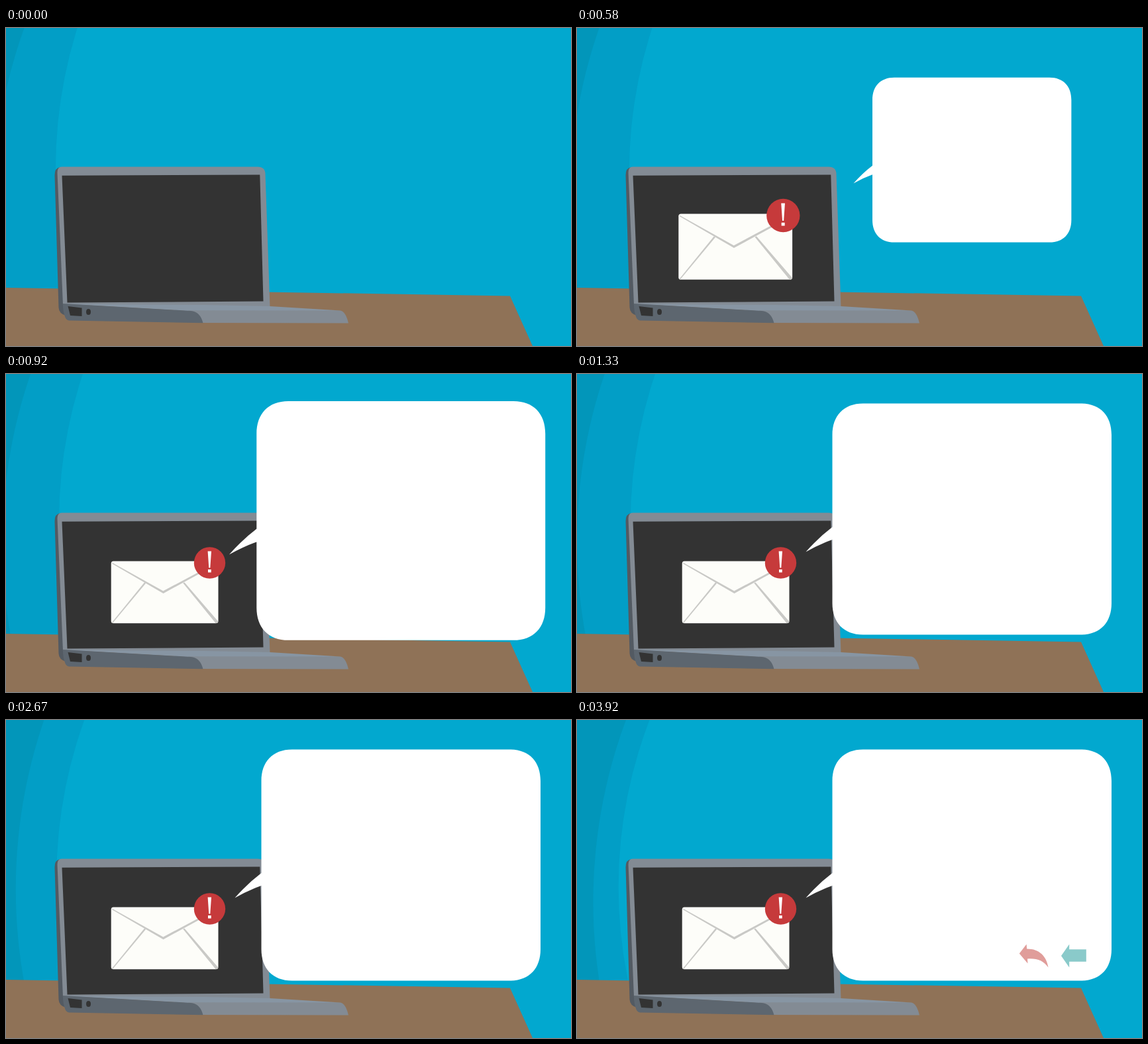
An HTML page that plays this animation: 853x480 px, repeating every 4.01 s.

```html
<!DOCTYPE html>
<html lang="en">
<head>
<meta charset="utf-8">
<title>New mail</title>
<style>
  html, body { margin: 0; width: 100%; height: 100%; overflow: hidden; background: #0296ba; }
  svg { display: block; width: 100vw; height: 100vh; }
</style>
</head>
<body>
<svg viewBox="0 0 853 480" preserveAspectRatio="none">
  <rect width="853" height="480" fill="#0296ba"/>
  <circle id="outer" r="785" fill="#029ec6"/>
  <circle id="inner" r="700" fill="#02a8cf"/>

  <path fill="#8f7257" d="M0 392 L761 404.5 L795 480 H0Z"/>

  <g id="laptop">
    <path fill="#535a62" d="M82 210 Q73.5 211 73.5 222 L79.5 422 Q80 431 90 434 L100 420Z"/>
    <path fill="#838b94" d="M84 209.5 H380 Q391 209.5 391.5 220 L398.5 421 L86 418 L77.5 218 Q77.5 209.5 84 209.5Z"/>
    <path fill="#333" d="M84.5 222.7 L383.3 221.4 L388.5 412.4 L92.5 414.6Z"/>
    <path fill="#8795a3" d="M90 416.5 L300 418 L398.5 420 L505 426.5 L400 431 L280 427.5Z"/>
    <path fill="#838b94" d="M275 426.3 L505 426.5 Q513 428 517 445.5 L290 445Z"/>
    <path fill="#5d666f" d="M86 416 L279 427 Q293 428 297.5 445.3 L95 441.5 Q90 441 88.5 434 Q86 428 86 416Z"/>
    <path fill="#333" d="M93.5 420 L114.5 422.5 V435 L97 434Z"/>
    <ellipse cx="124.5" cy="428.4" rx="3.5" ry="4.5" fill="#333"/>
  </g>

  <g id="mail">
    <rect x="158.7" y="282.6" width="161.8" height="93.6" rx="3.5" fill="#fdfdf9"/>
    <g fill="#c9c9c6">
      <path d="M160 284.5 L237.3 327.6 L318 284.5 L318.5 287 L237.5 331.2 L160.5 286.5Z"/>
      <path d="M159.7 375.3 L209 314.6 L211.2 315.8 L161.2 375.8Z"/>
      <path d="M267.2 315.6 L269.4 314.4 L320.3 373.5 Q320.3 376 316.5 376Z"/>
    </g>
    <circle cx="307.5" cy="285" r="23.7" fill="#c63a3b"/>
    <path fill="#fff" d="M304.6 267.6 H310 L308.3 292.4 H306.3Z M305 295 H309.7 V299.6 H305Z"/>
  </g>

  <path id="bubble" fill="#fff" d="M432 44.5 H760.5 C790 44.5 807 63 807 92 V346 C807 375 790 393.5 760.5 393.5
    H432 C402.5 393.5 385.5 375 385.5 346 V250 Q366 257 345.5 268.5 Q365 246.5 385.5 231 V92 C385.5 63 402.5 44.5 432 44.5Z"/>

  <path id="back" fill="#8acaca" d="M731 356 L743.2 338.5 V346.2 H768.8 V364.8 H743.2 V373.4Z"/>
  <path id="reply" fill="#e09d9a" d="M667.8 352.6 L678.6 338.5 L679.2 345.4 C697 345 709 356 711.5 373.5
    C704 363 695 359.5 680 360.4 L680.5 367.4Z"/>
</svg>
<script>
const LOOP = 4010, STEP = 1000 / 12, LAST = 47;
const PEAK = 1.088, RISE = 275, SETTLE = 391;
const $ = id => document.getElementById(id);

// Items that pop in: start time and the point they grow from
const pops = [
  { el: $("mail"), start: 167, x: 246, y: 317 },
  { el: $("bubble"), start: 417, x: 596, y: 150 },
  { el: $("back"), start: 2667, x: 750, y: 356 },
  { el: $("reply"), start: 2917, x: 689.5, y: 356 }
];

function ease(u) {
  u = Math.min(1, Math.max(0, u));
  return u * u * (3 - 2 * u);
}

// Grow past full size, then ease back
function popScale(t) {
  return t < RISE
    ? PEAK * ease(t / RISE)
    : PEAK - (PEAK - 1) * ease((t - RISE) / SETTLE);
}

// Place a backdrop disc by its leftmost point
function placeDisc(el, left, y) {
  el.setAttribute("cx", left + Number(el.getAttribute("r")));
  el.setAttribute("cy", y);
}

function draw(ms) {
  const s = ms / 1000;
  placeDisc($("outer"), -19.4 + 16.2 * s - 1.28 * s * s, 251.5 + 5 * (s - 1.78) ** 2);
  placeDisc($("inner"), 75 + 8.2 * s - 2.9 * s * s, 211.5 + 10.3 * s);
  for (const { el, start, x, y } of pops) {
    const k = popScale(ms - start);
    el.setAttribute("visibility", k > 0.001 ? "visible" : "hidden");
    el.setAttribute("transform", `translate(${x} ${y}) scale(${k}) translate(${-x} ${-y})`);
  }
}

const begin = performance.now();
function tick() {
  const t = (performance.now() - begin) % LOOP;
  // Twelve pictures a second
  draw(Math.min(LAST, Math.floor((t + 4) / STEP)) * STEP);
  requestAnimationFrame(tick);
}
tick();
</script>
</body>
</html>
```
